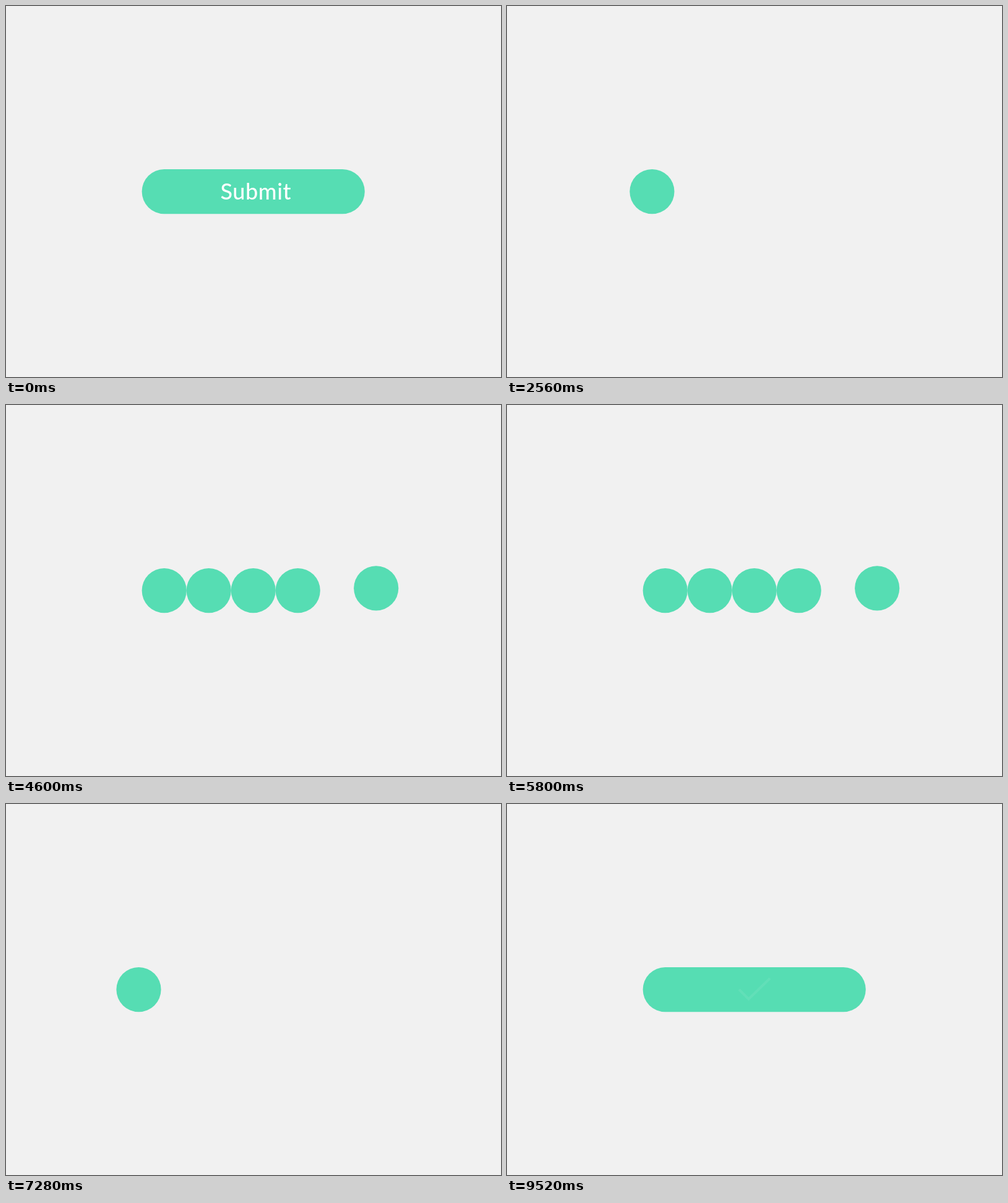
Animation of 800x600 px, one loop 9600 ms. Source, as an HTML page with a canvas:

```html
<!DOCTYPE html>
<html lang="en">
<head>
<meta charset="utf-8">
<title>Submit button</title>
<style>
  html, body { margin: 0; width: 100%; height: 100%; overflow: hidden; background: #f1f1f1; }
  canvas { display: block; }
</style>
</head>
<body>
<canvas width="800" height="600"></canvas>
<script>
const ctx = document.querySelector('canvas').getContext('2d');

const LOOP = 9600, STEP = 40;
const GREEN = '#56ddb3';
const RADIUS = 36.1, Y = 300.1;
const FIRST = 255.7, GAP = 72, LAST = FIRST + 4 * GAP;
const WIDTH = 4 * GAP;          // distance between the button's end caps
const LEFTMOST = 182;           // far point of the wind-up
const ROPE = 394, MAX_ANGLE = Math.PI / 10;
const SWING_START = 2858, SWING_END = 7058, HALF = 600, RISE = 222;

const progress = (t, from, to) => Math.min(1, Math.max(0, (t - from) / (to - from)));
const smooth = u => u * u * (3 - 2 * u);
const mix = (a, b, u) => a + (b - a) * u;

function pill(x, width = 0, y = Y) {
  ctx.beginPath();
  ctx.roundRect(x - RADIUS, y - RADIUS, width + 2 * RADIUS, 2 * RADIUS, RADIUS);
  ctx.fill();
}

function button(x, width, alpha, drawLabel) {
  ctx.save();
  pill(x, width);
  ctx.clip();
  ctx.globalAlpha = alpha;
  drawLabel();
  ctx.restore();
}

function submitLabel() {
  ctx.fillStyle = '#fff';
  ctx.font = '500 36px Lato, sans-serif';
  ctx.letterSpacing = '0.6px';
  ctx.textAlign = 'center';
  ctx.fillText('Submit', 403.8, 312.6);
}

function checkMark() {
  ctx.strokeStyle = '#fff';
  ctx.lineWidth = 4;
  ctx.beginPath();
  ctx.moveTo(375, 300);
  ctx.lineTo(390.5, 315.5);
  ctx.lineTo(425, 282);
  ctx.stroke();
}

// One ball travels along the row; the balls it has passed stay behind it.
function sweep(x) {
  for (let i = 0; i < 4; i++) {
    const rest = FIRST + i * GAP;
    if (rest < x) pill(rest);
  }
  pill(x);
}

function cradle(t) {
  const half = Math.floor(t / HALF), u = t % HALF;
  const fromTop = u < RISE ? 1 - u / RISE : (u - RISE) / (HALF - RISE);
  const angle = MAX_ANGLE * (1 - fromTop ** 3.5);
  const right = half % 2 === 0;
  for (let i = 0; i < 5; i++) {
    if (i !== (right ? 4 : 0)) pill(FIRST + i * GAP);
  }
  const dx = ROPE * Math.sin(angle);
  pill(right ? LAST + dx : FIRST - dx, 0, Y - ROPE * (1 - Math.cos(angle)));
}

function draw(t) {
  ctx.fillStyle = '#f1f1f1';
  ctx.fillRect(0, 0, 800, 600);
  ctx.fillStyle = GREEN;

  if (t < 2080) {
    const x = mix(FIRST, LEFTMOST, smooth(progress(t, 1562, 2082)));
    const width = WIDTH * (1 - smooth(progress(t, 1000, 1600)));
    button(x, width, 1 - progress(t, 1000, 1200), submitLabel);
  } else if (t < SWING_START) {
    sweep(mix(LEFTMOST, LAST, progress(t, 2080, SWING_START) ** 4));
  } else if (t < SWING_END) {
    cradle(t - SWING_START);
  } else if (t < 7460) {
    sweep(mix(LAST, LEFTMOST, 1 - (1 - progress(t, SWING_END, 7460)) ** 3));
  } else {
    const x = mix(LEFTMOST, FIRST, smooth(progress(t, 7460, 7800)));
    const width = WIDTH * smooth(progress(t, 7643, 8325));
    button(x, width, 1 - progress(t, 9320, 9535), checkMark);
  }
}

function frame() {
  const t = performance.now() % LOOP;
  draw(Math.floor(t / STEP) * STEP);
  requestAnimationFrame(frame);
}
frame();
</script>
</body>
</html>
```
